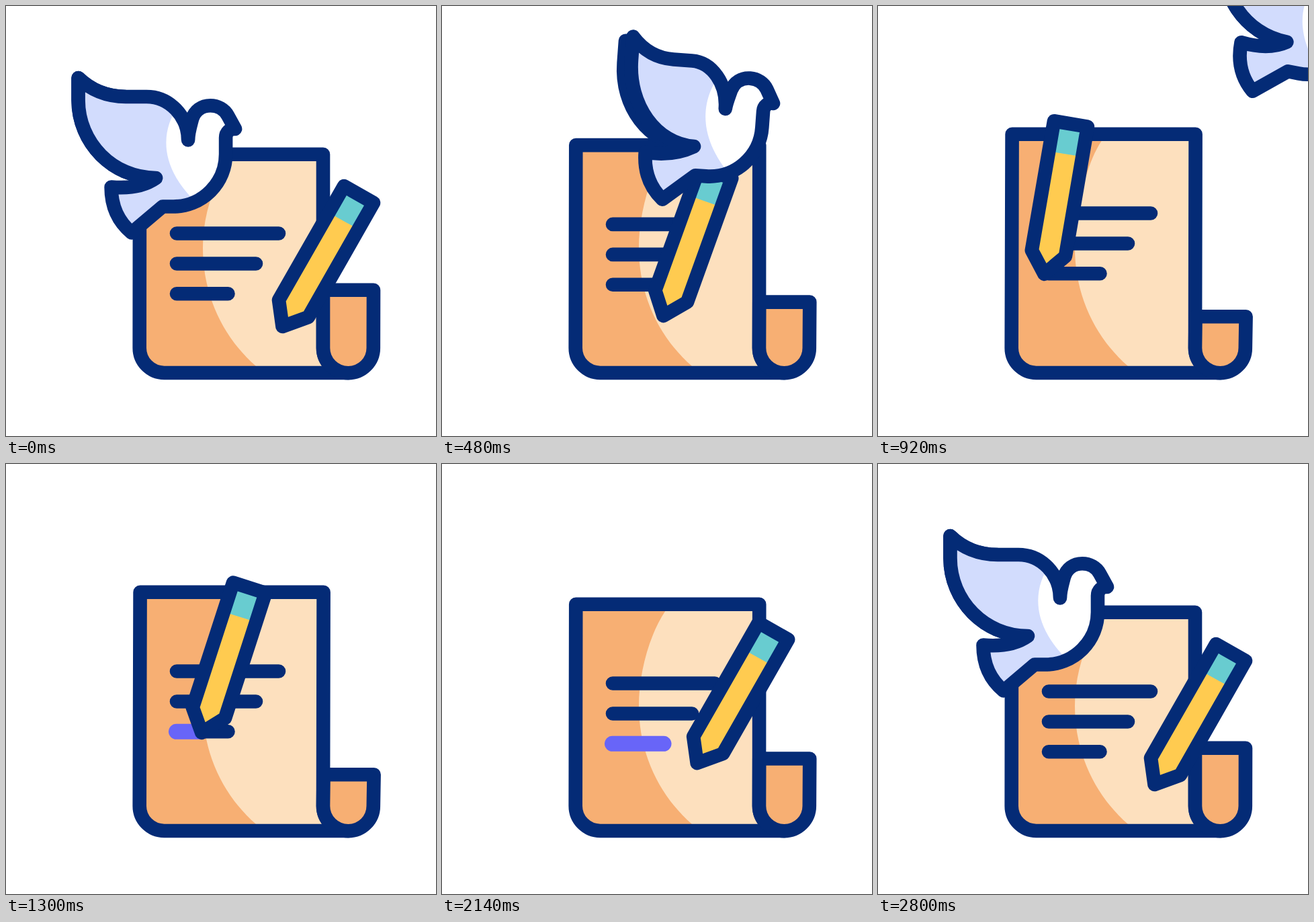
These frames come from a looping animation (640x640 px, 2.82 s). An HTML page:

```html
<!DOCTYPE html>
<html lang="en">
<head>
<meta charset="utf-8">
<title>Peace treaty</title>
<style>
  html, body { margin: 0; width: 100%; height: 100%; overflow: hidden; background: #fff; }
  svg { display: block; width: 100%; height: 100%; }
  .ink { stroke: #042b76; stroke-width: 20.6; stroke-linecap: round; stroke-linejoin: round; fill: none; }
  .tan { fill: #f7af73; }
  .cream { fill: #fde0be; }
  .lilac { fill: #d2dcfd; }
  .mark { stroke: #6865f8; stroke-width: 23; stroke-linecap: round; }
</style>
</head>
<body>
<svg viewBox="0 0 640 640">
  <defs>
    <path id="birdShape"/>
    <path id="pencilShape" d="M503 268L547 293L450 463L411.5 477L406 437.5Z"/>
    <clipPath id="birdClip"><use href="#birdShape"/></clipPath>
  </defs>
  <path id="page" class="tan"/>
  <path id="light" class="cream"/>
  <path id="pageEdge" class="ink"/>
  <path id="curl" class="ink tan"/>
  <g id="text">
    <path class="ink" d="M254 338.5H406M254 383.5H372M254 428.3H330.5"/>
    <path id="mark" class="mark"/>
  </g>
  <g id="pencil">
    <use href="#pencilShape" fill="#ffcb50"/>
    <path fill="#68ccd0" d="M503 268L547 293L524 332L480 307.5Z"/>
    <use href="#pencilShape" class="ink"/>
  </g>
  <g id="bird">
    <path id="backWing" class="ink lilac"/>
    <use href="#birdShape" class="lilac"/>
    <path id="breast" fill="#fff" clip-path="url(#birdClip)"/>
    <use href="#birdShape" class="ink"/>
  </g>
</svg>
<script>
const LOOP = 2820;
const set = (id, name, value) => document.getElementById(id).setAttribute(name, value);
const mix = (a, b, k) => a + (b - a) * k;

// Smooth progress from 0 to 1 between two times
const ease = (t, from, to) => {
  const s = Math.min(1, Math.max(0, (t - from) / (to - from)));
  return s * s * (3 - 2 * s);
};

const place = (id, dx, dy, angle, cx, cy) =>
  set(id, 'transform', `translate(${dx} ${dy}) rotate(${angle} ${cx} ${cy})`);

// Point mapper that scales about a pivot without thickening the stroke
const scaler = (cx, cy, sx, sy) => (x, y) => `${cx + (x - cx) * sx} ${cy + (y - cy) * sy} `;

// Wing from the tail notch round the tip to the top of the back
const wingEdge = at => at(223, 256) +
  `C${at(159, 256)}${at(107.5, 204)}${at(107.5, 140)}L${at(107.5, 107)}` +
  `C${at(128, 127)}${at(152, 135)}${at(178, 135)}`;

const shoulder = at => `L${at(209, 135)}C${at(243, 135)}${at(271, 164)}${at(271, 199.5)}`;

const bodyEdge = 'C271 188 275 176 277 168C281 156 291 148.3 304 148.3C315 148.3 325 154 330 163' +
  'L341 183C333 182 327 188 327 196V220A78 78 0 0 1 249 298.5H233L187 337.5' +
  'C167 321 156.5 298 156.5 269.5C184 272 206 268 ';

function drawPaper(t) {
  const p = ease(t, 200, 800) - ease(t, 1800, 2400);
  const rise = 30 * p, dx = 0.6 * p;
  const top = 220.7 - rise, curl = 422.7 + 39.5 * p;
  const base = 'L472 509A37.5 37.5 0 0 0 509.5 546';
  const page = `M${199 + dx} ${top}H${472 + dx}${base}H235.5A37 37 0 0 1 198.7 509Z`;
  set('page', 'd', page);
  set('pageEdge', 'd', page);
  set('light', 'd', `M${339 + dx} ${top}H472${base}H384L372 536C321 491.5 293 427.5 293 360` +
    `C293 314 307 ${269 - rise} ${332 + dx} ${231 - rise}Z`);
  set('curl', 'd', `M${472 + dx} ${curl}H${547 + dx}L546.8 509A37.4 37.2 0 0 1 472 509Z`);
  set('text', 'transform', `translate(0 ${-rise})`);
}

function drawMark(t) {
  const written = ease(t, 1000, 1640);
  set('mark', 'd', `M253.5 428.3H${mix(254, 330, written)}`);
  set('mark', 'opacity', written > 0 ? 1 - ease(t, 2400, 2700) : 0);
}

function drawPencil(t) {
  const reach = ease(t, 195, 770), write = ease(t, 990, 1620), back = ease(t, 1800, 2400);
  const turn = write ** 1.25;
  const x = -203.5 * reach + 123.5 * write + 80 * back;
  const y = -94 * mix(reach ** 3, reach, 0.4) + 14 * turn + 80 * back;
  place('pencil', x, y, -20 * (reach - turn), 476.5, 373);
}

function drawBird(t) {
  const flap = ease(t, 0, 300) - ease(t, 300, 600);
  const front = scaler(267, 264, 1 - 0.33 * flap, 1 + 0.144 * flap);
  const back = scaler(173, 230, 1 - 0.32 * flap, 1 + 0.02 * flap);
  const bend = 13 * flap;
  set('birdShape', 'd', `M${front(271, 199.5)}${bodyEdge}${wingEdge(front)}${shoulder(front)}Z`);
  set('backWing', 'd', `M${wingEdge(back)}`);
  set('breast', 'd', `M263 140C${229 + bend} 180 ${223 + bend} 240 291 300H400V130Z`);

  const leave = ease(t, -10, 1400), arrive = ease(t, 2000, 2800);
  const leaving = t < 1700;
  const x = leaving ? 535 * leave : -421 * (1 - arrive);
  const y = leaving ? -0.188 * x - 0.000833 * x * x : 0;
  const tilt = leaving ? 15 * leave : 15.4 * (1 - ease(t, 2380, 2770));
  place('bird', x, y, tilt, 224.5, 222.5);
}

const start = performance.now();
function frame() {
  const t = (performance.now() - start) % LOOP;
  drawPaper(t);
  drawMark(t);
  drawPencil(t);
  drawBird(t);
  requestAnimationFrame(frame);
}
frame();
</script>
</body>
</html>
```
